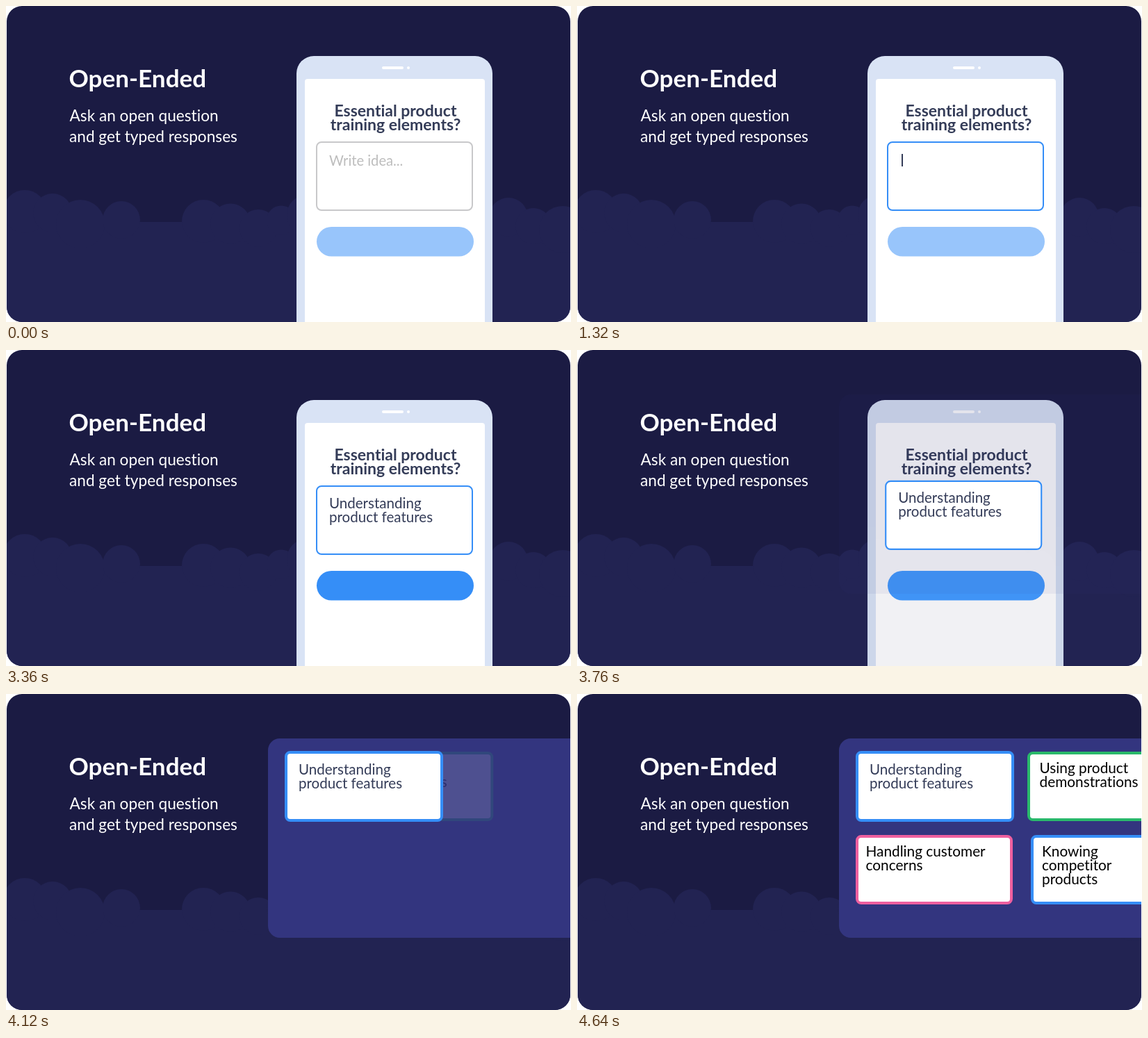
An HTML page that plays this animation: 813x455 px, repeating every 5.96 s.

```html
<!DOCTYPE html>
<html lang="en">
<head>
<meta charset="utf-8">
<title>Open-Ended</title>
<style>
  html, body { margin: 0; width: 100%; height: 100%; overflow: hidden; background: #fff; }
  svg { display: block; width: 100%; height: 100%; font-family: Lato, "Open Sans", sans-serif; font-variant-ligatures: none; }
  .head { font-size: 35.1px; font-weight: 700; fill: #fff; }
  .sub { font-size: 22.65px; fill: #fff; }
  .question { font-size: 23px; font-weight: 700; fill: #343c58; text-anchor: middle; }
  .note { font-size: 20.8px; white-space: pre; }
  .answer { font-size: 20.55px; fill: #343c58; }
  .hint { font-size: 20.2px; fill: #bdbdbd; }
</style>
</head>
<body>
<svg viewBox="0 0 813 455" xmlns="http://www.w3.org/2000/svg">
  <clipPath id="stage"><rect x="1" y=".1" width="811" height="454.9" rx="22"/></clipPath>
  <g clip-path="url(#stage)">
    <rect width="813" height="455" fill="#1b1b43"/>
    <g id="clouds" fill="#222352"><rect y="311" width="813" height="144"/></g>

    <text class="head" x="90.5" y="117">Open-Ended</text>
    <text class="sub" x="91.5" y="166">Ask an open question</text>
    <text class="sub" x="91" y="196">and get typed responses</text>

    <g id="phone">
      <rect x="418" y="72" width="282" height="420" rx="25" fill="#d9e3f5"/>
      <rect x="541" y="87" width="31" height="4" rx="2" fill="#fff"/>
      <circle cx="579" cy="89" r="2" fill="#fff"/>
      <rect x="430" y="105" width="259" height="380" rx="4" fill="#fff"/>
      <text class="question" x="560.5" y="158.5">Essential product</text>
      <text class="question" x="560.5" y="178.5">training elements?</text>
    </g>
    <rect id="button" x="447" y="318" width="226" height="42.5" rx="21.25"/>
    <rect id="panel" x="377" y="64" width="460" height="287" rx="17" fill="#33357f"/>
    <g id="cards"></g>

    <rect id="box" fill="#fff"/>
    <g id="answer">
      <text id="hint" class="hint" x="465" y="229.5">Write idea...</text>
      <text id="line0" class="note answer" x="465" y="227.5"></text>
      <text id="line1" class="note answer" x="465" y="247.5"></text>
      <rect id="caret" width="2" height="18" fill="#343c58"/>
    </g>
    <circle id="tap" fill="#98c5fb"/>
  </g>
</svg>
<script>
const LOOP = 5960;
const ANSWER = "Understanding\nproduct features";
const TYPE_START = 2080, CHAR_MS = 23, TYPE_END = 2880;
const GREY = [200, 200, 202], BLUE = [53, 142, 247], PALE = [152, 197, 251];

const $ = id => document.getElementById(id);
const set = (el, attrs) => {
  for (const name in attrs) el.setAttribute(name, attrs[name]);
  return el;
};
const add = (parent, tag, attrs, text = "") => {
  const el = set(document.createElementNS("http://www.w3.org/2000/svg", tag), attrs);
  el.textContent = text;
  return parent.appendChild(el);
};
const progress = (t, from, to) => Math.min(1, Math.max(0, (t - from) / (to - from)));
const smooth = u => u * u * (3 - 2 * u);
const mix = (a, b, u) => a + (b - a) * u;
const mixColor = (a, b, u) => `rgb(${a.map((v, i) => Math.round(mix(v, b[i], u)))})`;

// Border is drawn inside the given outer box
const frame = (x, y, w, h, line, stroke) => ({
  x: x + line / 2, y: y + line / 2, width: w - line, height: h - line,
  rx: 8 - line / 2, stroke, "stroke-width": line
});

// Cloud bumps: centre x, top y, radius
[[27, 265, 31], [67, 270, 28], [107, 279, 35], [166, 281, 27], [284, 279, 31],
 [323, 284.5, 29], [363, 293, 27], [396, 287.5, 21], [433, 272, 29], [471, 274, 27],
 [510, 277, 28], [548, 284, 25], [585, 275, 29], [625, 280, 27], [663, 288, 25],
 [723, 276, 28], [759, 291, 26], [801, 288, 34]
].forEach(([cx, top, r]) => add($("clouds"), "circle", { cx, cy: top + r, r }));

const cards = [
  { x: 648, y: 83, dx: -199, dy: 0, pad: 17.5, start: 4080, color: "#29b96b",
    lines: ["Using product", "demonstrations"] },
  { x: 401, y: 203, dx: 0, dy: -90, pad: 14.5, start: 4167, color: "#ee5f9f",
    lines: ["Handling customer", "concerns"] },
  { x: 653, y: 203, dx: -191, dy: -91, pad: 16, start: 4307, color: "#358ef7",
    lines: ["Knowing", "competitor", "products"] }
];
for (const card of cards) {
  card.el = add($("cards"), "g", {});
  add(card.el, "rect", { fill: "#fff", ...frame(0, 0, 226, 100, 4, card.color) });
  card.lines.forEach((line, i) =>
    add(card.el, "text", { class: "note", x: card.pad, y: 31 + 20 * i }, line));
}

function drawTyping(t) {
  const count = t < TYPE_START ? 0 : 1 + Math.floor((t - TYPE_START) / CHAR_MS);
  const lines = ANSWER.slice(0, count).split("\n");
  $("line0").textContent = lines[0];
  $("line1").textContent = lines[1] || "";
  set($("hint"), { opacity: t < 1320 ? 1 : 0 });

  const row = lines.length - 1;
  const shown = (t >= 1320 && t < 1600) || (t >= 1920 && t < TYPE_END);
  set($("caret"), {
    x: 467 + (lines[row] ? $("line" + row).getComputedTextLength() : 0),
    y: 213 + 20 * row,
    opacity: shown ? 1 : 0
  });
}

function drawTap(t) {
  const second = t >= 3360;
  const u = second ? progress(t, 3350, 3750) : progress(t, 670, 1080);
  set($("tap"), {
    cx: 585, cy: second ? 331 : 207,
    r: 30 * smooth(u), opacity: u > 0 ? 0.5 * (1 - u) : 0
  });
}

function draw(t) {
  const move = smooth(progress(t, 3725, 3960));
  const focus = smooth(progress(t, 660, 1080));

  set($("phone"), { opacity: 1 - move });
  set($("button"), {
    opacity: 1 - move,
    fill: mixColor(PALE, BLUE, smooth(progress(t, 2060, 2380)))
  });
  set($("panel"), { opacity: move });
  set($("box"), frame(mix(446, 401, move), mix(195, 82, move),
    mix(226, 228, move), mix(100, 102, move), mix(2, 4, move), mixColor(GREY, BLUE, focus)));
  set($("answer"), { transform: `translate(${-44 * move} ${-112 * move})` });

  drawTyping(t);
  drawTap(t);

  for (const { el, x, y, dx, dy, start } of cards) {
    const u = progress(t, start, start + 310);
    set(el, { opacity: u, transform: `translate(${x + dx * (1 - u)} ${y + dy * (1 - u)})` });
  }
}

const begin = performance.now();
function tick() {
  draw((performance.now() - begin) % LOOP);
  requestAnimationFrame(tick);
}
tick();
</script>
</body>
</html>
```
